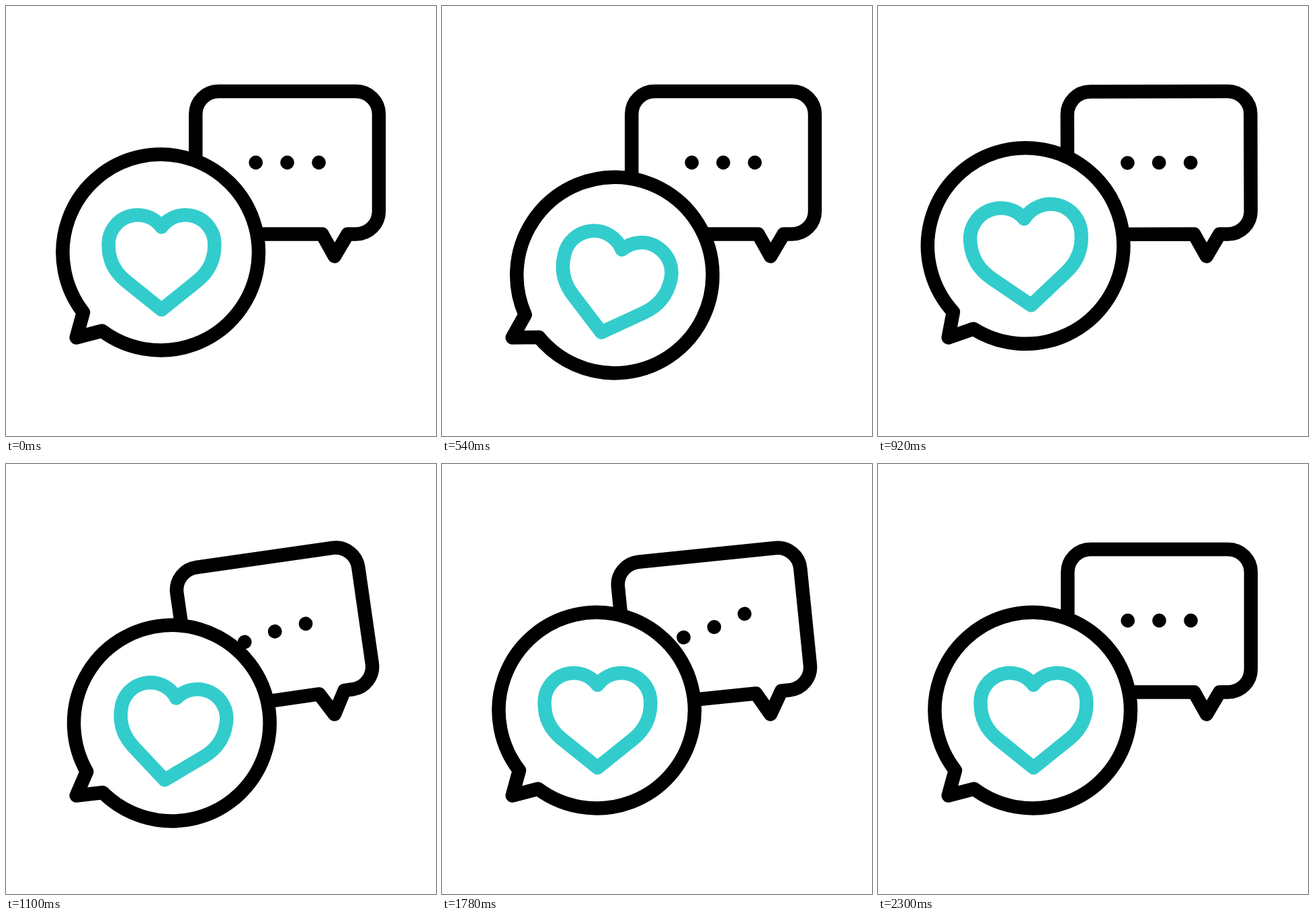
Write an HTML page that moves like this. It is 640x640 px and loops after 2.4 s.

```html
<!DOCTYPE html>
<html lang="en">
<head>
<meta charset="utf-8">
<title>Chat bubbles</title>
<style>
  html, body { margin: 0; width: 100%; height: 100%; overflow: hidden; background: #fff; }
  svg { display: block; width: 100%; height: 100%; }
  .line { fill: #fff; stroke: #000; stroke-width: 20.5; stroke-linecap: round; stroke-linejoin: round; }
  #heart { stroke: #33cccc; }
</style>
</head>
<body>
<svg viewBox="0 0 640 640">
  <g id="box">
    <path class="line" d="M316.3 127H521a34 34 0 0 1 34 34V305.5a34 34 0 0 1-34 34H508.5L489 372.5L470.5 339.5H316.3a34 34 0 0 1-34-34V161a34 34 0 0 1 34-34Z"/>
    <circle class="dot" cx="371.8" cy="233" r="10.4"/>
    <circle class="dot" cx="418.6" cy="233" r="10.4"/>
    <circle class="dot" cx="465.6" cy="233" r="10.4"/>
  </g>
  <g id="round">
    <path class="line" d="M115 456L104.7 493.5L143 483.5A145.8 145.8 0 1 0 115 456Z"/>
    <path class="line" id="heart" d="M231.5 329A43.6 43.6 0 0 0 152.6 356C152.6 378 162 396 178 409L231.5 452L285 409C301 396 310.4 378 310.4 356A43.6 43.6 0 0 0 231.5 329Z"/>
  </g>
</svg>
<script>
const LOOP = 2400, STEP = 20;
const box = document.getElementById("box");
const round = document.getElementById("round");
const heart = document.getElementById("heart");
const dots = document.querySelectorAll(".dot");

// Evenly spaced keys, eased in and out between neighbours.
function track(t, start, gap, keys) {
  const p = Math.min(Math.max((t - start) / gap, 0), keys.length - 1);
  const i = Math.min(Math.floor(p), keys.length - 2);
  const u = p - i;
  return keys[i] + (keys[i + 1] - keys[i]) * u * u * (3 - 2 * u);
}

function draw(t) {
  const tilt = track(t, 200, 300, [0, 15.2, -11.5, 8.1, 0]);
  round.setAttribute("transform", `rotate(${tilt} 104.7 493.5)`);

  const lean = track(t, 900, 300, [0, -11, 10.2, -6, 0]);
  box.setAttribute("transform", `rotate(${lean} 489 372.5)`);

  dots.forEach((dot, i) => {
    const dy = track(t, 900 + i * 100, 300, [0, 19, -18.7, 13, 0]);
    dot.setAttribute("transform", `translate(0 ${dy})`);
  });

  // The outline grows while its line weight stays constant.
  const beat = track(t, 200, 200, [0, 1, 0, 1, 0]) + track(t, 1900, 200, [0, 1, 0]);
  const s = 1 + 0.14 * beat;
  heart.setAttribute("transform", `translate(231.5 382) scale(${s}) translate(-231.5 -382)`);
  heart.style.strokeWidth = 20.5 / s;
}

const begin = performance.now();
function tick() {
  const t = (performance.now() - begin) % LOOP;
  draw(Math.floor(t / STEP) * STEP);
  requestAnimationFrame(tick);
}
draw(0);
requestAnimationFrame(tick);
</script>
</body>
</html>
```
